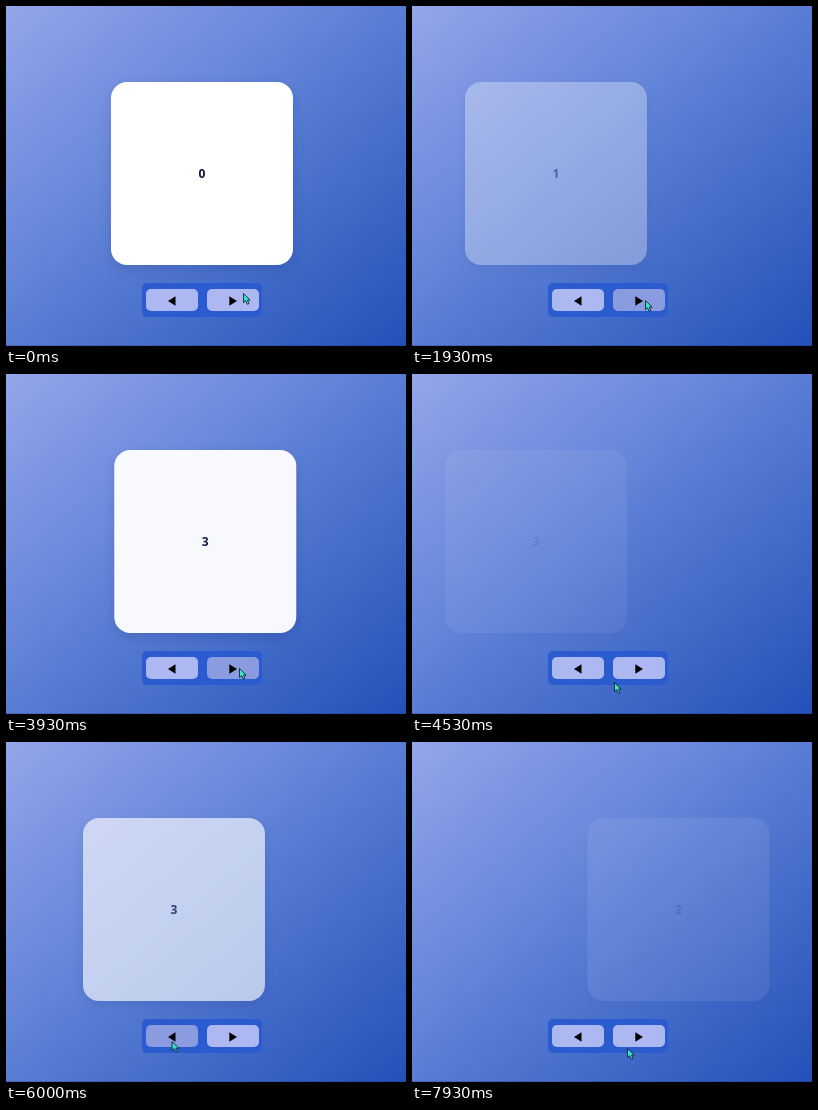
Animation, 400 px wide and 340 px high, one loop 8000 ms. Source, as an HTML page:

```html
<!DOCTYPE html>
<html lang="en">
<head>
<meta charset="utf-8">
<title>Card slider</title>
<style>
  html, body { margin: 0; width: 100%; height: 100%; overflow: hidden; }
  #stage {
    position: relative; width: 400px; height: 340px; overflow: hidden;
    background: linear-gradient(to bottom right, #94a5eb, #5b7fd5 48%, #2450b8);
  }
  #stage::after {
    content: ""; position: absolute; left: 0; right: 0; bottom: 0; height: 1px;
    background: rgba(20, 40, 110, .25);
  }
  .card {
    position: absolute; left: 105px; top: 76px; width: 182px; height: 182.5px;
    border-radius: 16px; background: #fff; color: #10163f;
    box-shadow: 0 4px 12px rgba(10, 25, 80, .14);
    font: 700 12px/183px "Open Sans", "Noto Sans", sans-serif;
    text-align: center; opacity: 0;
  }
  .bar {
    position: absolute; left: 136px; top: 277px; width: 120px; height: 34px;
    border-radius: 5px; background: #2a5ccf;
  }
  .button {
    position: absolute; top: 6px; width: 51.5px; height: 22px;
    border-radius: 5px; background: #adb8f3;
  }
  #prev { left: 4px; }
  #next { left: 65px; }
  .button svg { position: absolute; left: 0; top: 0; }
  #cursor { position: absolute; left: 0; top: 0; overflow: visible; }
</style>
</head>
<body>
<div id="stage">
  <div class="bar">
    <div class="button" id="prev"><svg width="52" height="22"><path d="M22 12L29.5 7.3V16.7Z"/></svg></div>
    <div class="button" id="next"><svg width="52" height="22"><path d="M30 12L22.3 7.3V16.7Z"/></svg></div>
  </div>
  <svg id="cursor" width="9" height="13">
    <path d="M.5 .5V9.6L2.7 7.8L4.3 11.3L6 10.5L4.5 7.1H7.2Z" fill="#38e2c4" stroke="#10243c" stroke-width=".9" stroke-linejoin="round"/>
  </svg>
</div>
<script>
const LOOP = 8000;
const SPAN = 8200; // leaves room for the last slide to be cut off mid-exit
const SLIDE = 535;
const SHIFT = 77;
const stage = document.getElementById('stage');
const bar = stage.querySelector('.bar');
const animations = [];

// Each step: [time, properties, easing]
function timeline(element, steps) {
  const frames = steps.map(([time, props, easing = 'linear']) =>
    ({ offset: time / SPAN, easing, ...props }));
  const animation = element.animate(frames, { duration: SPAN, fill: 'both' });
  animation.pause();
  animations.push(animation);
}

const at = (x, opacity) => ({ transform: `translateX(${x}px)`, opacity });

// Clicks: [time, direction], 1 = next, -1 = previous
const clicks = [[390, 1], [1668, 1], [2948, 1], [4105, 1], [5222, -1], [6420, -1], [7523, -1]];
let value = 0;
clicks.forEach(([leave, direction], i) => {
  const card = document.createElement('div');
  card.className = 'card';
  card.textContent = value;
  stage.insertBefore(card, bar);

  const steps = [];
  if (i === 0) {
    steps.push([0, at(0, 1)]);
  } else {
    const [clicked, from] = clicks[i - 1];
    const enter = clicked + SLIDE;
    const start = at(from * SHIFT, 0);
    steps.push([0, start], [enter, start, 'ease-out'], [enter + SLIDE, at(0, 1)]);
  }
  const gone = at(-direction * SHIFT, 0);
  steps.push([leave, at(0, 1), 'ease-out'], [leave + SLIDE, gone], [SPAN, gone]);
  timeline(card, steps);
  value += direction;
});

function hover(id, on, off) {
  const light = { backgroundColor: '#adb8f3' };
  const dark = { backgroundColor: '#8b9be0' };
  timeline(document.getElementById(id), [
    [0, light, 'step-end'], [on, dark, 'step-end'], [off, light], [SPAN, light]
  ]);
}
hover('next', 65, 4225);
hover('prev', 4860, 7760);

const path = [
  [0, 237, 287], [35, 237, 287], [70, 236, 289], [260, 236, 289], [330, 233, 294],
  [4130, 233, 294], [4200, 231, 302], [4330, 222, 308], [4600, 195, 308],
  [4870, 173, 302], [5130, 165.5, 299], [7700, 165.5, 299], [7930, 215, 306], [SPAN, 215, 306]
];
timeline(document.getElementById('cursor'),
  path.map(([time, x, y]) => [time, { transform: `translate(${x}px, ${y}px)` }]));

const began = performance.now();
function render() {
  const time = (performance.now() - began) % LOOP;
  for (const animation of animations) animation.currentTime = time;
  requestAnimationFrame(render);
}
render();
</script>
</body>
</html>
```
